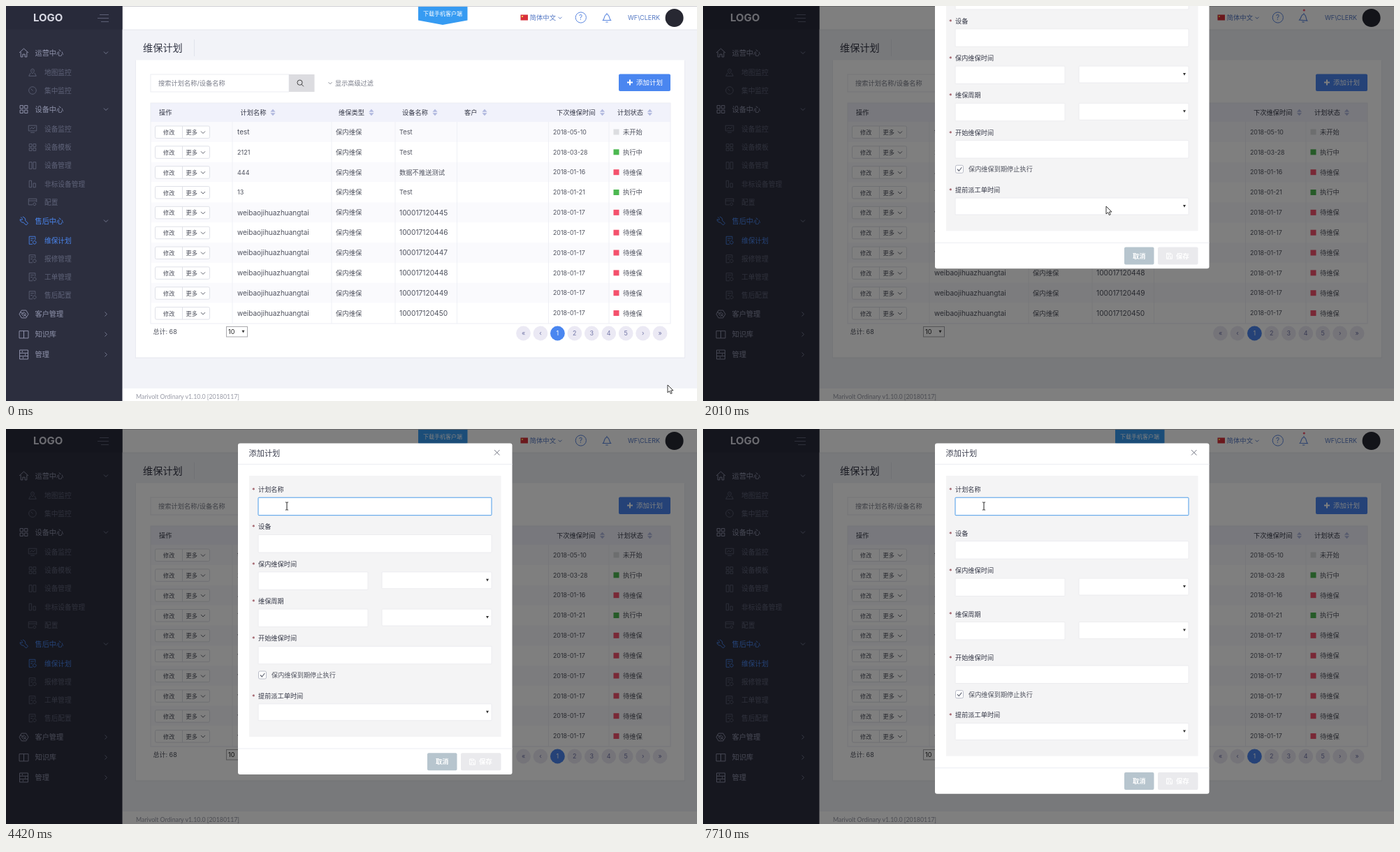
Write an HTML page that moves like this. It is 989 by 566 pixels and loops after 8000 ms.

```html
<!DOCTYPE html>
<html lang="zh">
<head>
<meta charset="utf-8">
<style>
html, body { margin: 0; width: 100%; height: 100%; overflow: hidden; background: #f2f3f8; }
svg { display: block; font-family: Inter, "Noto Sans CJK SC", "Noto Sans CJK", sans-serif; }
</style>
</head>
<body>
<svg id="stage" width="989" height="566" viewBox="0 0 989 566"></svg>
<script>
const BLUE = '#4a86f0', INK = '#50535f', DARK = '#343746', LINE = '#ebedf2';

// Markup helpers; text is placed by its left edge and vertical centre.
const text = (x, y, s, size, fill = INK, extra = '') =>
  `<text x="${x}" y="${y + size * .37}" font-size="${size}" fill="${fill}" ${extra}>${s}</text>`;
const rect = (x, y, w, h, fill, stroke = 'none', rx = 0, extra = '') =>
  `<rect x="${x}" y="${y}" width="${w}" height="${h}" fill="${fill}" stroke="${stroke}" rx="${rx}" ${extra}/>`;
const line = (d, stroke, width = 1, extra = '') =>
  `<path d="${d}" fill="none" stroke="${stroke}" stroke-width="${width}" ${extra}/>`;
const shape = (d, fill) => `<path d="${d}" fill="${fill}"/>`;
const down = (x, y, c, r = 3) => line(`M${x - r} ${y - r / 2}l${r} ${r}l${r} ${-r}`, c, .9);
const right = (x, y, c) => line(`M${x - 1.5} ${y - 3}l3 3l-3 3`, c, .9);
const arrow = (x, y) => shape(`M${x - 2} ${y - 1.7}h4l-2 3.6z`, '#333');
const icon = (d, x, y, size, c) =>
  line(d, c, .9, `transform="translate(${x - size / 2} ${y - size / 2}) scale(${size / 12})"`);
const group = (id, body) => `<g id="${id}">${body}</g>`;

const ICONS = {
  home: 'M0 6L6 .5L12 6M2 5V11.5H4.5V8H7.5V11.5H10V5',
  grid: 'M1 1h4v4h-4zM7 1h4v4h-4zM1 7h4v4h-4zM7 7h4v4h-4z',
  wrench: 'M2 1L4.3 3.3L3.5 4.8L1 4A4 4 0 0 0 5.5 8L9 11.5L11.5 9L8 5.5A4 4 0 0 0 4.5 .6',
  client: 'M3 1H9L12 6L9 11H3L0 6ZM3 6L6 3.5L9 6L6 9ZM1 3L6 6L10 10',
  book: 'M0 1.5H6V11H0ZM6 1.5H12V11H6Z',
  sliders: 'M.5 0H11.5V12H.5ZM.5 4H11.5M.5 8H11.5M4 1v2M8 5v2M5 9v2',
  pin: 'M6 8C2.5 5 3 1 6 1S9.5 5 6 8ZM6 3v1.5M3 7L.5 11.5H11.5L9 7',
  clock: 'M6 .5A5.5 5.5 0 1 1 5.9 .5M6.5 6.5L3.5 3.5',
  monitor: 'M0 1H12V9H0ZM3 11.5H9M2 6.5L5 4L7 6L10 3',
  columns: 'M1 1H5V11H1ZM7 1H11V11H7Z',
  bars: 'M1 1H4.5V11H1ZM7 5H10.5V11H7Z',
  panel: 'M6 10H0V1H12V6M0 4H12M9 7A2 2 0 1 1 8.9 7',
  doc: 'M10 5V0H1V11.5H6M3 3H8M3 6H6M9 6.5A2.4 2.4 0 1 1 8.9 6.5'
};

function sidebar() {
  const main = [['home', '运营中心', 67], ['grid', '设备中心', 148], ['wrench', '售后中心', 308],
    ['client', '客户管理', 441.5], ['book', '知识库', 470.5], ['sliders', '管理', 499.5]];
  const sub = [['pin', '地图监控', 95], ['clock', '集中监控', 121], ['monitor', '设备监控', 176],
    ['grid', '设备模板', 202.5], ['columns', '设备管理', 228.5], ['bars', '非标设备管理', 255],
    ['panel', '配置', 281], ['doc', '维保计划', 336], ['doc', '报修管理', 362.5],
    ['doc', '工单管理', 388.5], ['doc', '售后配置', 414.5]];
  return rect(0, 0, 166.5, 566, '#2c2e3e') + rect(0, 0, 166.5, 33.5, '#282a3a') +
    text(39, 16.5, 'LOGO', 15, '#d9dae4', 'font-weight="700"') +
    line('M134 12.5H147M131 17.5H147M136 22.5H147', '#5d6076') +
    main.map(([i, s, y], n) => {
      const c = n == 2 ? BLUE : '#9094ad';
      return icon(ICONS[i], 25.5, y, 13, c) + text(41.5, y, s, 10.2, c) +
        (n < 3 ? down : right)(143, y, '#7b7f98');
    }).join('') +
    sub.map(([i, s, y], n) => {
      const c = n == 7 ? BLUE : '#5f6379';
      return icon(ICONS[i], 38, y, 11.5, c) + text(55, y, s, 9.7, c);
    }).join('');
}

function header() {
  return rect(166.5, 33, 823, 2, '#eaebf1') + rect(166.5, 0, 823, 33.5, '#fff') +
    rect(166.5, 0, 823, 1, '#cfcfd2') +
    shape('M590 1H660.5V20.5L625 27L590 20.5Z', '#369bf2') +
    text(597, 11, '下载手机客户端', 8, '#fff', 'font-weight="500"') +
    rect(736.5, 12.5, 10.5, 8, '#d8303a') + rect(738, 14, 2, 2, '#f5d048') +
    text(749.5, 16.5, '简体中文', 9.4, '#5478c4') + down(793, 17, '#5478c4', 2.5) +
    `<circle cx="822.8" cy="16.5" r="7.6" fill="none" stroke="#5b87e0"/>` +
    text(820, 16.5, '?', 10, '#5b87e0') +
    group('bell', line('M854.5 20.5C857 18 856 12 860 12S863 18 865.5 20.5ZM858.3 23h3.4M860 12v-2', '#5b87e0', 1.1)) +
    `<circle id="dot" cx="860.3" cy="6" r="1.6" fill="#f4516c"/>` +
    text(890, 16.5, 'WF\\CLERK', 9, '#5478c4') +
    `<circle cx="956.6" cy="17" r="13" fill="#272832"/>`;
}

function table() {
  const heads = [['操作', 219], ['计划名称', 335.5, 382], ['维保类型', 476, 523], ['设备名称', 567, 614],
    ['客户', 656, 685], ['下次维保时间', 788, 853.5], ['计划状态', 875, 921.5]];
  const first = [['test', 'Test', '05-10', 0], ['2121', 'Test', '03-28', 1],
    ['444', '数据不推送测试', '01-16', 2], ['13', 'Test', '01-21', 1]];
  const states = [['未开始', '#dcdde0'], ['执行中', '#4cb850'], ['待维保', '#f4516c']];
  let out = rect(207, 139, 744, 27, '#f1f2fb');
  for (const [s, x, sort] of heads) {
    out += text(x, 152.5, s, 9.25, DARK, 'font-weight="500"');
    if (sort) out += shape(`M${sort - 3.6} 151.7h7.2l-3.6 -4zM${sort - 3.6} 153.3h7.2l-3.6 4z`, '#b0b8de');
  }
  for (let i = 0; i < 10; i++) {
    const y = 180.5 + 28.84 * i;
    const [name, device, date, state] = first[i] || ['weibaojihuazhuangtai', '1000171204' + (41 + i), '01-17', 2];
    const [label, color] = states[state];
    out += rect(207, y - 14.4, 744, 28.84, i % 2 ? '#fff' : '#fafafd') +
      rect(213.5, y - 8.5, 78, 17.5, '#fff', '#dfe1e8', 2) + line(`M252.5 ${y - 8.5}v17.5`, '#dfe1e8') +
      text(225, y + .5, '修改', 8.2) + text(257.5, y + .5, '更多', 8.2) + down(282, y + .5, INK) +
      text(331, y, name, isNaN(name) ? 10 : 9) + text(472, y, '保内维保', 9.35) +
      text(563, y, device, isNaN(device) ? 9.3 : 10.2) +
      text(783, y, '2018-' + date, 8.8) +
      rect(869.5, y - 4, 8, 8, color) + text(883, y, label, 9.3);
  }
  out += line('M324 166V455M466 166V455M557 166V455M645.5 166V455M776.5 166V455M863 166V455', '#eff0f5');
  return out + rect(207, 139, 744, 316, 'none', '#ecedf4');
}

function page() {
  const pages = ['«', '‹', 1, 2, 3, 4, 5, '›', '»'];
  return text(196, 59.5, '维保计划', 14.2, DARK) + line('M269.5 48V72', '#e1e4ec') +
    rect(185, 78, 787, 427, '#eaebf2') + rect(186, 77.5, 785, 426, '#fff') +
    rect(207, 98, 198, 25, '#fff', LINE) + rect(405, 98, 36.5, 25, '#dcdce0') +
    `<circle cx="420.5" cy="109.7" r="3.6" fill="none" stroke="#444"/>` + line('M423 112.3l3 3', '#444') +
    text(218, 110.5, '搜索计划名称/设备名称', 9.25, '#7c7f8b') +
    down(464, 110.5, '#7c7f8b', 2.5) + text(471, 110.5, '显示高级过滤', 9.15, '#7c7f8b') +
    rect(877, 97.5, 74, 24.5, BLUE, 'none', 2) + line('M889 109.5h8M893 105.5v8', '#fff', 2) +
    text(902, 109.7, '添加计划', 9.5, '#fff', 'font-weight="500"') +
    table() +
    text(210.5, 467, '总计: 68', 9) + rect(315.5, 459.5, 30, 14.5, '#fff', '#a9a9ad') +
    text(318, 467, '10', 9, '#222') + arrow(339.5, 466.5) +
    pages.map((s, i) => {
      const x = 740.5 + 24.45 * i, on = s === 1;
      return `<circle cx="${x}" cy="469" r="10.4" fill="${on ? BLUE : '#ebe9f4'}"/>` +
        text(x, 469, s, 9, on ? '#fff' : '#7478a8', 'text-anchor="middle"');
    }).join('') +
    rect(166.5, 548, 823, 18, '#fff') +
    text(186, 560, 'Marivolt Ordinary v1.10.0 [20180117]', 8.8, '#989aa6', 'font-family="Lato, sans-serif"');
}

function dialog() {
  const label = (y, s, id = '') => text(352, y + 1, '*', 9, '#8c3c46') + text(361, y, s, 9.2, DARK, id);
  const input = (y, x = 361, w = 334, id = '') => rect(x, y, w, 25.5, '#fff', '#ececef', 1, id);
  const select = (y, x, w) => rect(x, y, w, 24, '#fff', '#ececef', 1) + arrow(689, y + 11.7);
  const pair = y => input(y, 361, 157) + select(y, 538, 157);
  return rect(332, 20.5, 392.5, 474.5, '#fff', 'none', 3, 'id="box"') +
    text(347.5, 35, '添加计划', 11.2, '#3f4252') + line('M699 30l7.5 7.5M706.5 30l-7.5 7.5', '#777a86') +
    line('M332 50.5H724.5', LINE) + rect(348, 67, 360.5, 374, '#f4f4f5', 'none', 0, 'id="panel"') +
    label(87, '计划名称') + input(98.2, 361, 334, 'id="name"') +
    group('upper', label(140, '设备', 'id="device"') + input(151.5) + label(193.3, '保内维保时间') + pair(204.8)) +
    group('middle', label(246.7, '维保周期') + pair(258)) +
    group('lower', label(300, '开始维保时间') + input(311.3) +
      rect(361.5, 347, 11, 11, '#fff', '#b9bcc8', 2) + line('M364 352.5l2.3 2.5l4 -5', '#666a78', 1.2) +
      text(380, 352.8, '保内维保到期停止执行', 9.2) +
      label(382.4, '提前派工单时间') + select(393.8, 361, 334) +
      line('M332 458H724.5', LINE) +
      rect(603, 464.3, 42.5, 25, '#b7c5ce', 'none', 2) + text(615, 477, '取消', 9.2, '#fff', 'font-weight="700"') +
      rect(651, 464.3, 57.5, 25, '#eaeaed', 'none', 2) +
      line('M663.5 473h6l2 2v6h-8zM665.5 473v2.5h3.5v-2.5M665.5 481v-3h4v3', '#fff') +
      text(677, 477, '保存', 9.4, '#fff', 'font-weight="700"')) +
    group('list', rect(360.5, 124.5, 336, 16.5, '#fff', '#cfd0d4') +
      text(366, 133, 'weibaojihuazhuangtai', 8.4, '#000', 'font-weight="700" font-family="Liberation Sans, sans-serif"')) +
    text(373, 111, '', 9.3, '#575962', 'id="typed"') +
    rect(0, 105.5, 1, 11.5, '#333', 'none', 0, 'id="caret"');
}

const $ = id => document.getElementById(id);
$('stage').innerHTML = rect(0, 0, 989, 566, '#f2f3f8') + page() + header() + sidebar() +
  group('veil', rect(0, 0, 989, 566, '#000', 'none', 0, 'opacity=".5"')) + group('dialog', dialog()) +
  group('pointer',
    `<path id="hand" d="M0 0V11L2.6 8.7L4.4 12.6L6.2 11.8L4.5 8H8Z" fill="#fff" stroke="#222" stroke-width=".9"/>` +
    line('M-2 -5.5H-.5L0 -5L.5 -5.5H2M0 -5V5M-2 5.5H-.5L0 5L.5 5.5H2', '#222', 1, 'id="beam"'));

const LOOP = 8000, OPEN = 2010, FOCUS = 3720;
const keys = [[FOCUS, ''], [4770, 'w'], [5000, 'we'], [6860, 'w'], [7100, '']];
const caretX = [373, 380.5, 385.5];
const route = [[70, 947, 543], [1090, 914, 112], [1240, 914, 112], [1800, 577, 287],
  [OPEN, 577, 287], [2270, 545, 243], [2900, 402, 110.5], [LOOP, 402, 110.5]];

const clamp = v => Math.max(0, Math.min(1, v));
const show = (id, on) => $(id).setAttribute('visibility', on ? 'visible' : 'hidden');
const move = (id, x, y) => $(id).setAttribute('transform', `translate(${x} ${y})`);

function pointerAt(t) {
  const i = Math.max(1, route.findIndex(k => k[0] > t));
  const [a, b] = [route[i - 1], route[i]];
  const p = clamp((t - a[0]) / (b[0] - a[0])), e = p * p * (3 - 2 * p);
  return [a[1] + (b[1] - a[1]) * e, a[2] + (b[2] - a[2]) * e];
}

function draw(t) {
  const alert = t % 1020 >= 510;
  show('dot', alert);
  $('bell').setAttribute('transform', `rotate(${alert ? 6 * Math.sin(t / 60) : 0} 860 11)`);

  const [x, y] = pointerAt(t), editing = t > 2270 && y < 124;
  move('pointer', x, y);
  show('hand', !editing);
  show('beam', editing);

  const open = t >= OPEN;
  $('veil').style.display = $('dialog').style.display = open ? '' : 'none';
  // Hidden parts must not inherit a visible state from the previous loop.
  if (!open) return;
  move('dialog', 0, -118.75 * (1 - clamp((t - 2130) / 140)) ** 2);

  // Rows grow when validation space opens under a field.
  const a = t >= 7100 ? 9.2 : 0, grow = t >= 4770 ? 9.25 : 0, c = a + 2 * grow;
  move('upper', 0, a);
  move('middle', 0, a + grow);
  move('lower', 0, c);
  $('box').setAttribute('height', 474.5 + c);
  $('panel').setAttribute('height', 374 + c);

  const key = keys.filter(k => k[0] <= t).pop();
  const value = key ? key[1] : '';
  $('typed').textContent = value;
  $('name').setAttribute('stroke', key ? '#4a9be8' : '#ececef');
  $('caret').setAttribute('x', caretX[value.length]);
  show('caret', key && (t - key[0]) % 1060 < 530);
  show('list', t >= 4770 && t < 6860);
  $('device').setAttribute('fill', t >= 6860 && t < 7100 ? '#2c6a34' : DARK);
}

function frame() {
  draw(performance.now() % LOOP);
  requestAnimationFrame(frame);
}
frame();
</script>
</body>
</html>
```
